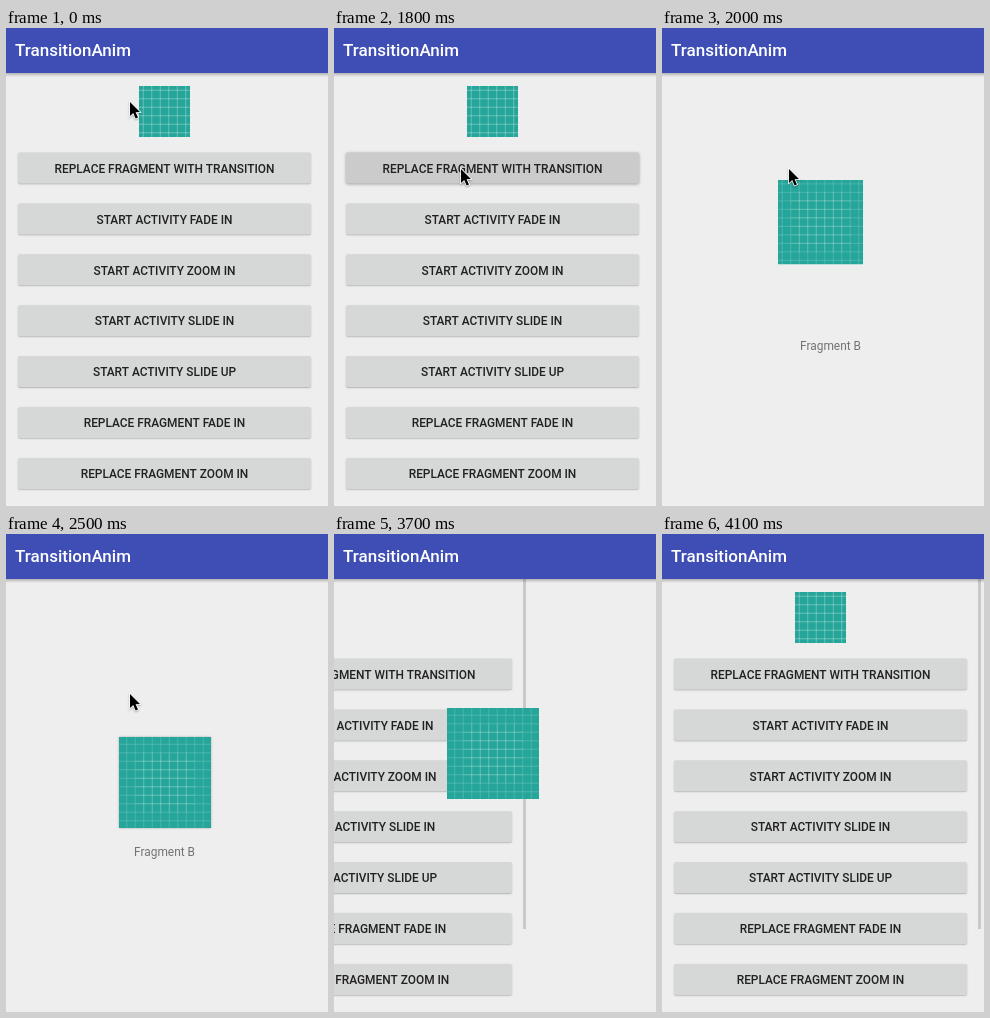
An HTML page with a canvas that plays this animation: 322x478 px, repeating every 4.7 s.

```html
<!DOCTYPE html>
<html lang="en">
<head>
<meta charset="utf-8">
<title>TransitionAnim</title>
<style>
html, body { margin: 0; width: 100%; height: 100%; overflow: hidden; background: #eee; }
canvas { display: block; width: 322px; height: 478px; }
</style>
</head>
<body>
<canvas id="stage"></canvas>
<script>
const W = 322, H = 478, LOOP = 4700, STEP = 100;
const DP = 0.85; // pixels per density-independent unit
const MID = 158.5;
const LABELS = [
  'REPLACE FRAGMENT WITH TRANSITION', 'START ACTIVITY FADE IN',
  'START ACTIVITY ZOOM IN', 'START ACTIVITY SLIDE IN',
  'START ACTIVITY SLIDE UP', 'REPLACE FRAGMENT FADE IN',
  'REPLACE FRAGMENT ZOOM IN'
];

// Progress per step of the page change
const SLIDE = [0, 0.606, 0.969, 1];
const MOVE = [0, 0.2, 0.65, 0.95, 1];
const GROW = [0, 0, 0.83, 1];

// Pointer stops: time, x, y
const POINTER = [
  [0, 124, 74], [100, 105, 75], [200, 92, 76],
  [500, 95, 80], [600, 104, 95], [700, 115, 117], [800, 123, 134], [900, 127, 141],
  [2500, 124, 160], [2600, 115, 219], [2700, 102, 310], [2800, 91, 400], [2900, 85, 456]
];
const POINTER_END = 3000;

const canvas = document.getElementById('stage');
const ctx = canvas.getContext('2d');
const dpr = window.devicePixelRatio || 1;
canvas.width = W * dpr;
canvas.height = H * dpr;

const lerp = (a, b, p) => a + (b - a) * p;
const at = (steps, k) => steps[Math.max(0, Math.min(k, steps.length - 1))];

function text(str, x, y, font, color, align = 'center') {
  ctx.font = font + ' Roboto, sans-serif';
  ctx.fillStyle = color;
  ctx.textAlign = align;
  ctx.fillText(str, x, y);
}

function box(x, y, w, h, r, color) {
  ctx.fillStyle = color;
  ctx.beginPath();
  ctx.roundRect(x, y, w, h, r);
  ctx.fill();
}

function button(label, y, pressed) {
  ctx.save();
  ctx.shadowColor = pressed ? 'rgba(0,0,0,.35)' : 'rgba(0,0,0,.25)';
  ctx.shadowBlur = (pressed ? 3 : 1.5) * dpr;
  ctx.shadowOffsetY = 0.8 * dpr;
  box(12, y, 293, 31, 2, pressed ? '#cbcbcb' : '#d6d7d7');
  ctx.restore();
  text(label, MID, y + 20.2, '500 11.9px', '#212121');
}

function menu(x, pressed, scrollbar) {
  ctx.save();
  ctx.translate(x, 0);
  LABELS.forEach((label, i) => button(label, 124.5 + i * 50.9, pressed && i === 0));
  if (scrollbar) box(316, 45, 3, 350, 0, '#c9c9c9');
  ctx.restore();
}

function gridLines(from, to, first, last) {
  ctx.beginPath();
  for (let v = first; v <= last; v += 10) {
    ctx.moveTo(v, from);
    ctx.lineTo(v, to);
    ctx.moveTo(from, v);
    ctx.lineTo(to, v);
  }
  ctx.stroke();
}

// The grid keeps its scale; the tile only reveals more of it.
function tile(move, grow, lifted) {
  const size = lerp(51, 92, grow), tall = lerp(51, 91, grow);
  const x = Math.round(lerp(133, 113, grow)), y = Math.round(lerp(58, 203, move));
  ctx.save();
  ctx.save();
  if (lifted) {
    ctx.shadowColor = 'rgba(0,0,0,.3)';
    ctx.shadowBlur = 2 * dpr;
  }
  box(x, y, size, tall, 0, '#26a69a');
  ctx.restore();
  ctx.beginPath();
  ctx.rect(x, y, size, tall);
  ctx.clip();
  ctx.translate(x + size / 2, y + tall / 2);
  ctx.scale(DP, DP);
  ctx.translate(-54, -54);
  ctx.strokeStyle = 'rgba(255,255,255,.2)';
  ctx.lineWidth = 0.95;
  gridLines(0, 108, 9, 99);
  gridLines(19, 89, 29, 79);
  ctx.restore();
}

function toolbar() {
  const shade = ctx.createLinearGradient(0, 45, 0, 49);
  shade.addColorStop(0, 'rgba(0,0,0,.25)');
  shade.addColorStop(1, 'rgba(0,0,0,0)');
  ctx.fillStyle = shade;
  ctx.fillRect(0, 45, W, 4);
  box(0, 0, W, 45, 0, '#3f4eb5');
  text('TransitionAnim', 9, 28, '500 17px', '#fff', 'left');
}

function pointer(t) {
  if (t >= POINTER_END) return;
  const [, x, y] = POINTER.filter(p => p[0] <= t).pop();
  ctx.save();
  ctx.translate(x, y);
  ctx.beginPath();
  [[0, 0], [0, 14], [3.2, 11], [5.6, 16.4], [8, 15.4], [5.6, 10.2], [10, 10]]
    .forEach(([px, py]) => ctx.lineTo(px, py));
  ctx.closePath();
  ctx.shadowColor = 'rgba(0,0,0,.3)';
  ctx.shadowBlur = 2 * dpr;
  ctx.shadowOffsetY = dpr;
  ctx.strokeStyle = '#fff';
  ctx.lineWidth = 1.6;
  ctx.stroke();
  ctx.shadowColor = 'transparent';
  ctx.fillStyle = '#000';
  ctx.fill();
  ctx.restore();
}

function draw(t) {
  const back = t >= 3700;
  const k = Math.round((t - (back ? 3600 : 1800)) / STEP);
  const toward = steps => back ? 1 - at(steps, k) : at(steps, k);
  const slide = toward(SLIDE);

  ctx.setTransform(dpr, 0, 0, dpr, 0, 0);
  box(0, 0, W, H, 0, '#eee');
  if (slide < 1) menu(-Math.round(W * slide), t >= 1800 && !back, back);
  if (slide > 0) {
    const x = 158.5 + Math.round(W * (1 - slide));
    text('Fragment B', x, 322.3, '400 11.9px', '#737373');
  }
  toolbar();
  tile(toward(MOVE), toward(GROW), t >= 2500 && !back);
  pointer(t);
}

function frame() {
  const t = performance.now() % LOOP;
  draw(Math.floor(t / STEP) * STEP);
  requestAnimationFrame(frame);
}
frame();
</script>
</body>
</html>
```
